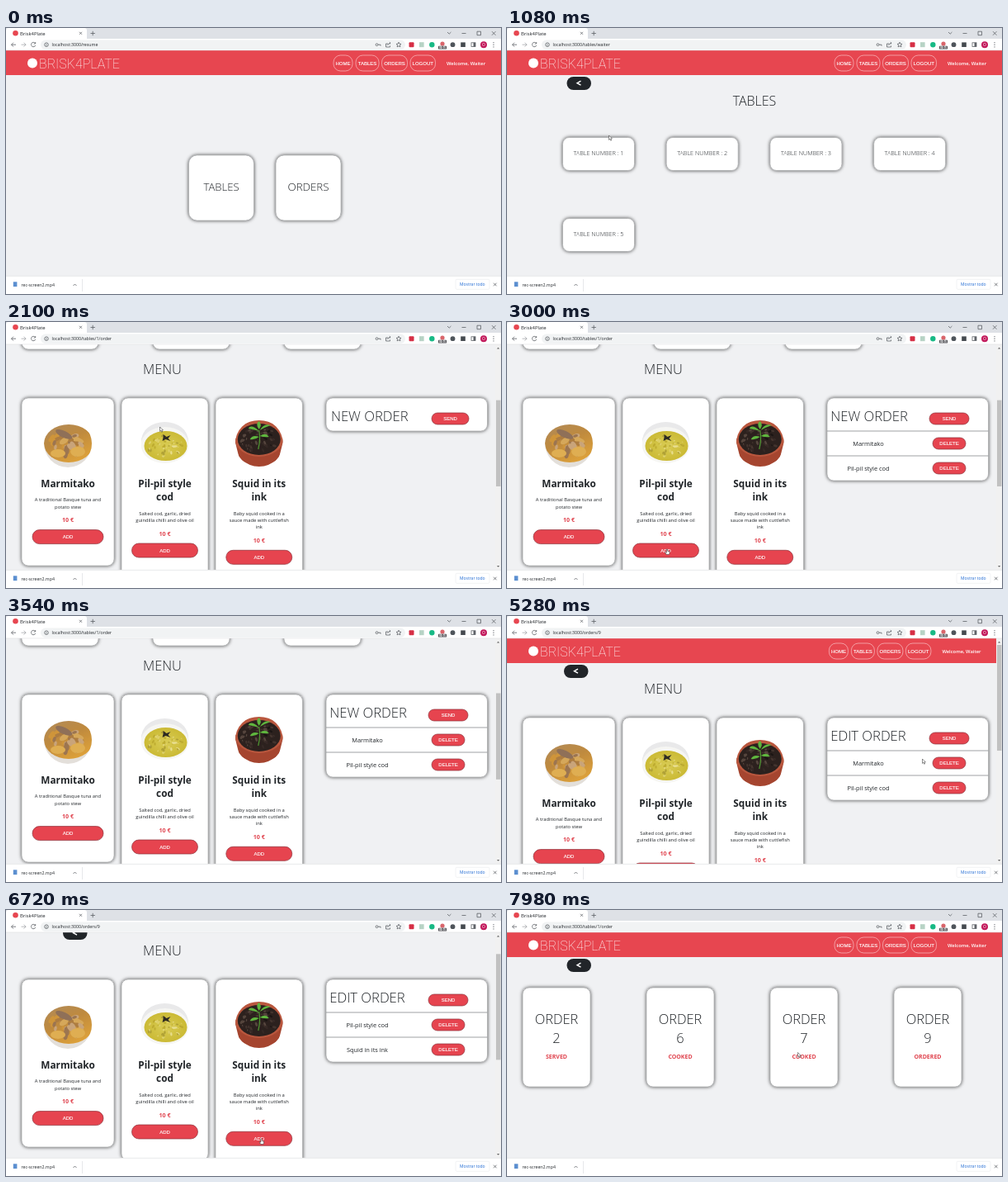
Write an HTML page that moves like this. It is 600 px wide and 322 px high and loops after 8000 ms.

```html
<!DOCTYPE html>
<html lang="en">
<head>
<meta charset="utf-8">
<title>Brisk4Plate</title>
<style>
  html, body { margin: 0; width: 100%; height: 100%; overflow: hidden; background: #f0f1f3; }
  svg { display: block; width: 100vw; height: 100vh; }
  text { font-family: "Open Sans", "Noto Sans", sans-serif; fill: #212529; white-space: pre; }
  .mid { text-anchor: middle; }
  .light { font-weight: 300; }
  .bold { font-weight: 700; }
  .red { fill: #e0434e; font-weight: 700; }
  .btn { font-family: "Liberation Sans", sans-serif; font-size: 6px; fill: #fff; stroke: #fff; stroke-width: .15; text-anchor: middle; }
  .brand { font: 200 16px Roboto, sans-serif; fill: #fff; }
  .card { fill: #fff; stroke: #8a8c8f; stroke-width: .5; filter: url(#shadow); }
  .icon { fill: none; stroke: #5f6368; stroke-width: .8; }
</style>
</head>
<body>
<svg viewBox="0 0 600 322" preserveAspectRatio="none">
  <defs>
    <filter id="shadow" x="-20%" y="-20%" width="140%" height="140%">
      <feDropShadow dx="0" dy="0" stdDeviation="2" flood-color="#000" flood-opacity=".75"/>
    </filter>
    <clipPath id="view"><rect y="27" width="600" height="273"/></clipPath>
    <clipPath id="round"><circle r="29"/></clipPath>
    <linearGradient id="stew" x2=".6" y2="1">
      <stop stop-color="#b08a5a"/><stop offset=".5" stop-color="#bf8a3e"/><stop offset="1" stop-color="#dca03a"/>
    </linearGradient>
    <radialGradient id="sauce">
      <stop stop-color="#d9cc55"/><stop offset="1" stop-color="#cbba35"/>
    </radialGradient>
  </defs>

  <rect width="600" height="322" fill="#f0f1f3"/>
  <g clip-path="url(#view)"><g id="page"></g></g>
  <g id="bar">
    <rect x="593" y="27" width="7" height="273" fill="#f1f1f1"/>
    <path d="M595 32.5l1.6-1.8 1.6 1.8zM595 295l1.6 1.8 1.6-1.8z" fill="#606060"/>
    <rect id="thumb" x="594" width="5.5" fill="#c1c1c1"/>
  </g>

  <!-- browser frame -->
  <rect width="600" height="13" fill="#dee1e6"/>
  <path d="M0 13V3q0-3 3-3H95q3 0 3 3V13z" fill="#fff"/>
  <circle cx="11.5" cy="6.3" r="3.3" fill="#e74650"/>
  <text x="17" y="8.5" font-size="5.9">Brisk4Plate</text>
  <path class="icon" d="M89 4.8l3 3m0-3l-3 3M102.5 6.5h5.4M105.2 3.8v5.4M535 5l2.2 2.2L539.4 5M552.5 6.5h5M571 4.2h4.5v4.5h-4.5zM589 4.2l4.5 4.5m0-4.5l-4.5 4.5"/>
  <rect y="13" width="600" height="14" fill="#fff"/>
  <path d="M0 27h600" stroke="#d5d7da" stroke-width=".5"/>
  <rect x="42" y="14.6" width="442" height="11.4" rx="5.7" fill="#f1f3f4"/>
  <path class="icon" d="M12 20.2H6.5m2.5-2.5l-2.5 2.5 2.5 2.5"/>
  <path class="icon" d="M18.5 20.2H24m-2.5-2.5l2.5 2.5-2.5 2.5" stroke-opacity=".55"/>
  <path class="icon" d="M35.3 18.4a2.7 2.7 0 1 0 .4 2.6M35.7 17v2h-2"/>
  <circle class="icon" cx="49" cy="20.2" r="2.3" stroke-width=".7"/>
  <path class="icon" d="M49 19.9v1.5M49 18.8v.5" stroke-width=".6"/>
  <text id="url" x="55.5" y="22.2" font-size="5.25"></text>
  <circle class="icon" cx="449.5" cy="20.2" r="1.4"/>
  <path class="icon" d="M451 20.2h3v1.5"/>
  <path class="icon" d="M463 19h-2.5v4h5v-1.5M462.5 21q.5-2.5 3.5-2.7m-1.2-1.2l1.3 1.2-1.3 1.2" stroke-width=".7"/>
  <path class="icon" d="M476 17.2l.9 2 2.1.2-1.6 1.4.5 2.1-1.9-1.1-1.9 1.1.5-2.1-1.6-1.4 2.1-.2z" stroke-width=".6"/>
  <rect x="488.5" y="17.2" width="6" height="6" rx="1" fill="#d62f45"/>
  <rect x="501" y="17.2" width="5.6" height="6" fill="#b7d3c5"/>
  <circle cx="516.3" cy="20.2" r="3.2" fill="#18b985"/>
  <circle cx="529" cy="19" r="2.6" fill="#d9656b"/>
  <rect x="524" y="21.8" width="10" height="3.8" rx=".6" fill="#4b4b50"/>
  <text class="mid bold" x="529" y="25" font-size="3.2" style="fill:#fff">00:15</text>
  <circle cx="541.5" cy="20.2" r="2.9" fill="#4f555b"/>
  <rect x="551.2" y="17.4" width="5.6" height="5.6" fill="#454a4f"/>
  <rect class="icon" x="564" y="17.8" width="5" height="4.8"/>
  <path d="M566.5 17.8h2.5v4.8h-2.5z" fill="#5f6368"/>
  <circle cx="579" cy="20.2" r="4" fill="#c2185b"/>
  <text class="mid" x="579" y="22" font-size="5" style="fill:#fff">O</text>
  <path d="M591 17.6v.1m0 2.5v.1m0 2.5v.1" stroke="#5f6368" stroke-width="1.2" stroke-linecap="round"/>

  <!-- download shelf -->
  <rect y="300" width="600" height="22" fill="#fff"/>
  <path d="M0 300.3h600M92.5 304v15" stroke="#d7d9dc" stroke-width=".6"/>
  <rect x="8.8" y="307.3" width="4.6" height="5.8" fill="#5b8fd0"/>
  <text x="18.5" y="312.5" font-size="5.2">rec-screen2.mp4</text>
  <path class="icon" d="M81.5 312l2-2 2 2M591 308.7l3.6 3.6m0-3.6l-3.6 3.6"/>
  <rect x="545" y="304.3" width="41" height="12" rx="1.5" fill="#fff" stroke="#e3e5e8" stroke-width=".5"/>
  <text class="mid" x="565.3" y="312.3" font-size="5" style="fill:#1a67d2">Mostrar todo</text>

  <g id="cursor" fill="#fff" stroke="#222" stroke-width=".5">
    <path id="arrow" d="M0 0v5.4l1.3-1.1.9 2 .9-.4-.9-2h1.7z"/>
    <path id="hand" d="M-.6 0q.6-.8 1.2 0v2.3l2.4.6v2.3l-.7 1.3h-3l-1.8-2.7.7-.4 1.2.9z"/>
  </g>
</svg>

<script>
const $ = id => document.getElementById(id);
const LOOP = 8000, STEP = 60, VIEW = 273, TRACK = 258;

const text = (s, x, y, size, cls = '') =>
  `<text class="${cls}" x="${x}" y="${y}" font-size="${size}">${s}</text>`;
const box = (x, y, w, h, r = 8) =>
  `<rect class="card" x="${x}" y="${y}" width="${w}" height="${h}" rx="${r}"/>`;
const pill = (s, x, y, w, h) =>
  `<rect x="${x}" y="${y}" width="${w}" height="${h}" rx="${h / 2}" fill="#e6444f" stroke="#8b3038" stroke-width=".7"/>
   <text class="btn" x="${x + w / 2}" y="${y + h / 2 + 2.1}">${s}</text>`;

function header(scrolls, back = true) {
  const nav = [['HOME', 397, 23], ['TABLES', 424, 28], ['ORDERS', 455.5, 31], ['LOGOUT', 490, 30.5]]
    .map(([s, x, w]) => `<rect x="${x}" y="33" width="${w}" height="19" rx="8.5" fill="none" stroke="#fbd5d8" stroke-width=".6"/>
      <text class="btn" x="${x + w / 2}" y="44.6">${s}</text>`).join('');
  const backX = scrolls ? 69 : 72.5;
  return `<rect y="27" width="600" height="30" fill="#e74650"/>
    <circle cx="32" cy="42.5" r="6" fill="#fff"/>
    <text class="brand" x="40" y="48.5">BRISK4PLATE</text>
    <g transform="translate(${scrolls ? -6.6 : 0})">${nav}
      <text x="534" y="44.5" font-size="5.8" font-weight="600" style="fill:#fff">Welcome, Waiter</text></g>` +
    (back ? `<rect x="${backX}" y="59" width="29.5" height="16" rx="8" fill="#212529"/>
      <path d="M${backX + 17} 64.2l-4.5 2.5 4.5 2.5" fill="none" stroke="#fff" stroke-width="1.4"/>` : '');
}

// Repeatable scatter of small pieces inside an ellipse.
function scatter(count, rx, ry, cy, size, colors) {
  let seed = count;
  const rnd = () => (seed = (seed * 16807 + 11) % 2147483647) / 2147483647;
  return Array.from({ length: count }, () => {
    const a = rnd() * 40, d = Math.sqrt(rnd()), s = size * (.5 + rnd());
    const x = Math.cos(a) * d * rx, y = cy + Math.sin(a) * d * ry;
    return `<ellipse rx="${s}" ry="${s * .55}" fill="${colors[Math.floor(rnd() * colors.length)]}"
      transform="translate(${x} ${y}) rotate(${a * 30})"/>`;
  }).join('');
}

const photos = [
  `<ellipse cy="5" rx="31" ry="24" fill="#e3dfda"/><ellipse cx="1" cy="0" rx="30" ry="23" fill="url(#stew)"/>` +
  scatter(34, 24, 16, 1, 4.5, ['#d5a75a', '#9c7550', '#cf953a', '#ad7c40', '#c9a47a']) +
  `<g fill="#dfae52"><ellipse cx="-12" cy="12" rx="9" ry="5"/><ellipse cx="12" cy="10" rx="9" ry="6"/></g>
   <g fill="#8f7058"><ellipse cx="-9" cy="-8" rx="11" ry="4" transform="rotate(25)"/></g>`,
  `<ellipse cy="-3" rx="29" ry="23" fill="#e9e9ea"/><ellipse cy="2" rx="29" ry="22" fill="#f6f6f3"/>
   <ellipse cx="1" cy="3" rx="26" ry="18" fill="url(#sauce)"/>` +
  scatter(46, 22, 14, 3, 1.8, ['#e8dd8c', '#beac30', '#ded06a', '#b0a136']) +
  `<path d="M-2-11l4 3 5-2-3 4 3 3-6-2-4 2 1-4z" fill="#2e2b22"/>`,
  `<path d="M-30-6L-24 18Q0 38 24 18L30-6z" fill="#a5452f"/><ellipse cy="-6" rx="29.500" ry="22" fill="#b9573e"/>
   <ellipse cy="-5" rx="26" ry="19" fill="#2c211e"/>`.replace('29.500', '29.5') +
  scatter(50, 23, 16, -5, 1.9, ['#43342e', '#1b1514', '#55453d', '#352825']) +
  `<path d="M-1 7Q2-5 0-16" stroke="#4f9a32" stroke-width="1.2" fill="none"/>
   <g fill="#5fb63e"><path d="M0-15q-10-9-13-3 6 1 13 3zM1-16q5-9 13-6-6 2-13 6zM0-17q-5-7 0-10 4 4 0 10zM1-9q7-5 11 1-6 1-11-1zM0-8q-8-3-11 3 6 1 11-3z"/></g>`
];

const dishes = [
  { x: 19, w: 112, h: 203, name: ['Marmitako'], info: ['A traditional Basque tuna and', 'potato stew'] },
  { x: 140, w: 105, h: 219, name: ['Pil-pil style', 'cod'], info: ['Salted cod, garlic, dried', 'guindilla chilli and olive oil'] },
  { x: 254, w: 105.5, h: 227, name: ['Squid in its', 'ink'], info: ['Baby squid cooked in a', 'sauce made with cuttlefish', 'ink'] }
];

function dishCard({ x, w, h, name, info }, i) {
  const cx = x + w / 2;
  let y = 230.5, out = box(x, 123, w, h) +
    `<g transform="translate(${cx} 178)"><g clip-path="url(#round)">${photos[i]}</g></g>`;
  for (const s of name) { out += text(s, cx, y, 11.8, 'mid bold'); y += 16.4; }
  y += 1.5;
  for (const s of info) { out += text(s, cx, y, 5.8, 'mid'); y += 8.3; }
  const bw = i ? 80 : 86;
  return out + text('10 €', cx, y + 8.4, 7.1, 'mid red') + pill('ADD', cx - bw / 2, y + 17.6, bw, 17);
}

function menu(title, rows, dy = 0) {
  let out = text('MENU', 166, 93.5, 16.4, 'light') + dishes.map(dishCard).join('') +
    box(388, 123, 195.5, 40 + 30 * rows.length) +
    text(title, rows.length ? 392.3 : 394, 151.2, 16.6, 'light') +
    (rows.length ? pill('SEND', 512, 141, 48, 14) : pill('SEND', 516, 141, 45, 14));
  rows.forEach((s, i) => {
    const y = 163 + 30 * i;
    out += `<path d="M388 ${y}h195.5" stroke="#95979a" stroke-width=".9"/>` +
      text(s, 438, y + 18, 7.4, 'mid') + pill('DELETE', 516, y + 8, 40, 14);
  });
  return `<g transform="translate(0 ${dy})">${out}</g>`;
}

const orders = [[2, 'SERVED'], [6, 'COOKED'], [7, 'COOKED'], [9, 'ORDERED']];
function orderCards(count, pitch) {
  const tall = count > 3, w = tall ? 82 : 93;
  return orders.slice(0, count).map(([n, state], i) => {
    const x = 19 + pitch * i, cx = x + w / 2;
    return box(x, 94, w, tall ? 120 : 95) + (tall
      ? text('ORDER', cx, 138, 16.4, 'mid light') + text(n, cx, 161, 16.4, 'mid light')
      : text('ORDER ' + n, cx, 138, 16.4, 'mid light')) +
      text(state, cx, tall ? 180 : 157, 7, 'mid red');
  }).join('');
}

const homePage = header(false, false) +
  box(221.5, 154, 79, 79, 10) + text('TABLES', 261, 196.7, 13.1, 'mid light') +
  box(327, 154, 79, 79, 10) + text('ORDERS', 366.5, 196.7, 13.3, 'mid light');

const tablesPage = header(false) + text('TABLES', 300, 94, 16, 'mid light') +
  [0, 1, 2, 3, 4].map(i => {
    const x = 67.5 + 125.7 * (i % 4), y = i < 4 ? 132.5 : 230.5;
    return box(x, y, 87, 40) + text('TABLE NUMBER : ' + (i + 1), x + 43.5, y + 21.5, 7.25, 'mid light');
  }).join('');

const [stew, cod, squid] = ['Marmitako', 'Pil-pil style cod', 'Squid in its ink'];
const tableOrder = (...rows) => header(true) + orderCards(3, 159) + menu('NEW ORDER', rows, 125);
const editOrder = (...rows) => header(true) + menu('EDIT ORDER', rows);

// start time, address, content height (0: no scrollbar), content
const scenes = [
  [0, 'resume', 0, homePage],
  [660, 'tables/waiter', 0, tablesPage],
  [1440, 'tables/1/order', 675, tableOrder()],
  [2520, 'tables/1/order', 675, tableOrder(stew)],
  [3000, 'tables/1/order', 675, tableOrder(stew, cod)],
  [3900, 'tables/1/order', 698, header(true) + orderCards(4, 148) + menu('NEW ORDER', [], 148)],
  [5040, 'orders/9', 550, editOrder(stew, cod)],
  [5940, 'orders/9', 550, editOrder(cod)],
  [6660, 'orders/9', 550, editOrder(cod, squid)],
  [7620, 'tables/1/order', 0, header(false) + orderCards(4, 150)]
];

// time, scroll offset
const scrollKeys = [[0, 0], [1620, 0], [2100, 156], [3480, 156], [3540, 153], [3660, 117], [3840, 117],
  [3900, 140], [4200, 140], [4500, 0], [5340, 0], [5520, 39], [6960, 39], [7140, 0]];

// time, x, y
const cursorKeys = [[0, 300, 265], [540, 262, 200], [660, 262, 200], [1080, 123.5, 130], [1200, 117, 148],
  [1500, 117, 148], [2100, 186.5, 127], [2400, 78, 259], [2640, 78, 259], [2940, 194, 275], [3180, 194, 275],
  [3840, 537, 153], [4200, 537, 153], [4800, 503.5, 173], [5280, 503.5, 173], [5880, 536, 139],
  [6120, 536, 139], [6600, 309.5, 277], [6900, 309.5, 277], [7320, 536, 148], [7560, 536, 148], [7980, 352.5, 172.5]];

const handTimes = [[480, 660], [1200, 1440], [2340, 2640], [2880, 3180], [3780, 4200], [4800, 5040],
  [5820, 6120], [6540, 6960], [7260, 7620]];
const hiddenTimes = [[0, 60], [3420, 3600]];
const within = (spans, t) => spans.some(([a, b]) => t >= a && t < b);

function at(keys, t) {
  const i = keys.findLastIndex(k => k[0] <= t);
  const a = keys[i], b = keys[i + 1];
  if (!b) return a.slice(1);
  const u = (t - a[0]) / (b[0] - a[0]), e = u * u * (3 - 2 * u);
  return a.slice(1).map((v, j) => v + (b[j + 1] - v) * e);
}

let shown;
function draw(now) {
  const t = Math.floor((now % LOOP) / STEP) * STEP;
  const scene = scenes.findLast(s => s[0] <= t);
  const [, url, height, content] = scene;
  if (scene !== shown) {
    shown = scene;
    $('page').innerHTML = content;
    $('url').textContent = 'localhost:3000/' + url;
    $('bar').style.display = height ? '' : 'none';
  }
  const [scroll] = at(scrollKeys, t);
  $('page').setAttribute('transform', `translate(0 ${-scroll})`);
  if (height) {
    $('thumb').setAttribute('y', 35 + scroll / height * TRACK);
    $('thumb').setAttribute('height', VIEW / height * TRACK);
  }
  const [x, y] = at(cursorKeys, t), hand = within(handTimes, t);
  $('cursor').setAttribute('transform', `translate(${x} ${y})`);
  $('cursor').style.display = within(hiddenTimes, t) ? 'none' : '';
  $('hand').style.display = hand ? '' : 'none';
  $('arrow').style.display = hand ? 'none' : '';
}

const start = performance.now();
function tick() {
  draw(performance.now() - start);
  requestAnimationFrame(tick);
}
tick();
</script>
</body>
</html>
```
